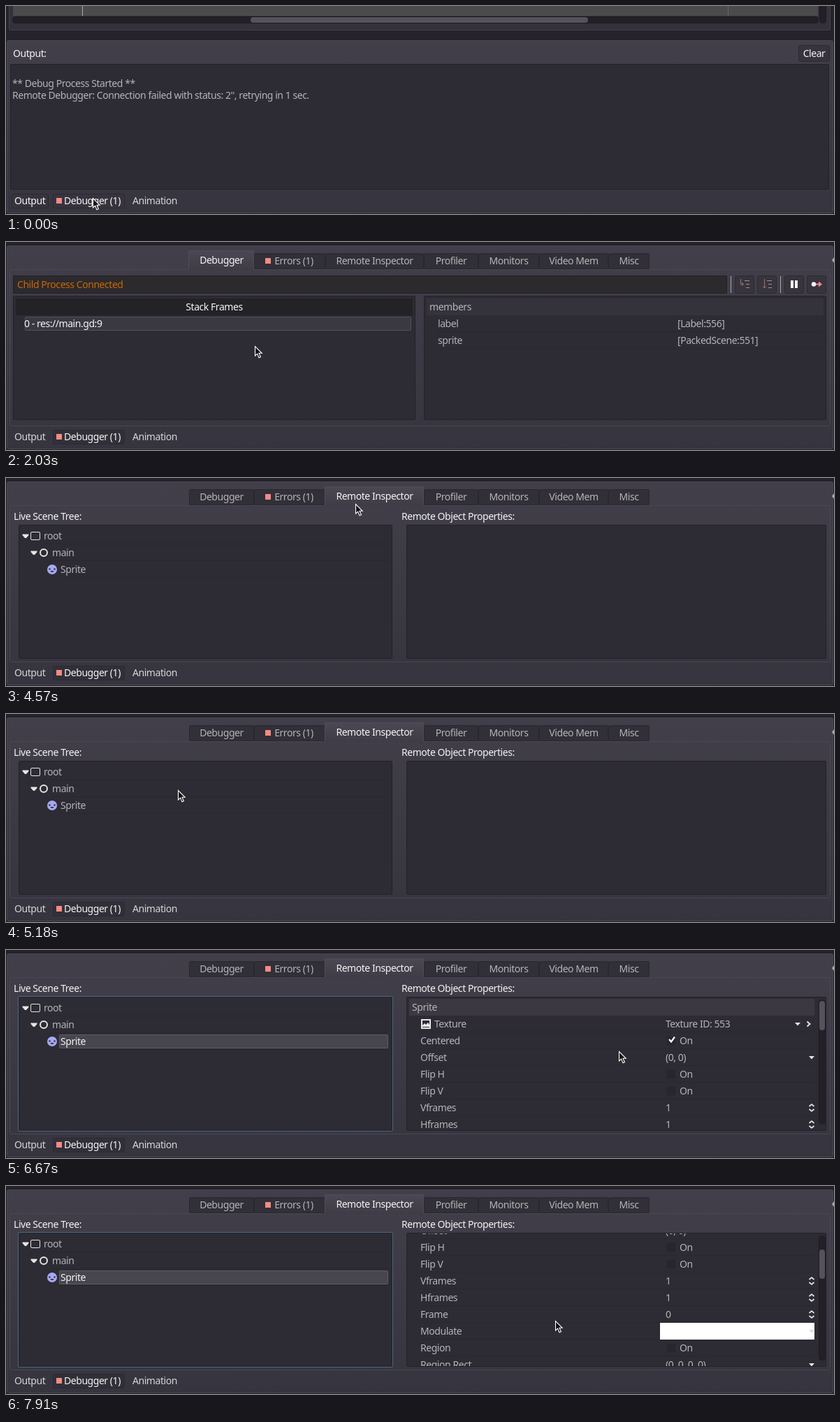
An HTML page that plays this animation: 1185x298 px, repeating every 8000 ms.

```html
<!DOCTYPE html>
<html lang="en">
<head>
<meta charset="utf-8">
<title>Debugger panel</title>
<style>
  html, body { margin: 0; width: 100%; height: 100%; overflow: hidden; background: #24222a; }
  svg { display: block; width: 1185px; height: 298px; }
  text { font: 14px "Noto Sans", "Open Sans", sans-serif; letter-spacing: -0.45px; white-space: pre; }
</style>
</head>
<body>
<svg id="stage" viewBox="0 0 1185 298">
  <defs>
    <linearGradient id="window" x1="0" y1="0" x2="0" y2="1">
      <stop offset="0" stop-color="#423f4a"/><stop offset="1" stop-color="#36343e"/>
    </linearGradient>
    <linearGradient id="tab" x1="0" y1="0" x2="0" y2="1">
      <stop offset="0" stop-color="#4b4854"/><stop offset="1" stop-color="#3f3c47"/>
    </linearGradient>
    <clipPath id="list"><rect x="574" y="68" width="599" height="190"/></clipPath>
  </defs>
</svg>
<script>
const LOOP = 8000;
const WHITE = '#f4f4f4', SOFT = '#b5b4b7', WELL = '#2d2b33', EDGE = '#232128', RED = '#f68a84';
const stage = document.getElementById('stage');

function add(parent, tag, attrs = {}, content) {
  const node = document.createElementNS('http://www.w3.org/2000/svg', tag);
  for (const key in attrs) node.setAttribute(key, attrs[key]);
  if (content !== undefined) node.textContent = content;
  return parent.appendChild(node);
}
const group = (parent = stage, attrs = {}) => add(parent, 'g', attrs);
const path = (g, d, attrs) => add(g, 'path', { d, fill: 'none', ...attrs });
const line = (g, d, stroke) => path(g, d, { stroke });

// Filled box given by its corners; a border is drawn inside the edge.
function box(g, x1, y1, x2, y2, fill, stroke, rx = 0) {
  const inset = stroke ? 0.5 : 0;
  return add(g, 'rect', {
    x: x1 + inset, y: y1 + inset, width: x2 - x1 - 2 * inset, height: y2 - y1 - 2 * inset,
    rx, fill, stroke: stroke || 'none'
  });
}
// Text placed by the middle of its line.
function label(g, x, mid, content, fill = WHITE, attrs = {}) {
  return add(g, 'text', { x, y: mid + 5, fill, ...attrs }, content);
}
const centered = { 'text-anchor': 'middle' };
const well = (g, x1, y1, x2, y2) => box(g, x1, y1, x2, y2, WELL, EDGE, 1);
const redSquare = (g, x, y) => box(g, x, y, x + 8, y + 8, RED);
const button = (g, x1, y1, x2, y2) => box(g, x1, y1, x2, y2, '#37343e', '#2b2931', 2);

function windowFrame(g, top) {
  box(g, 1, top, 1184, 297, 'url(#window)', '#4a4753', 2);
}

// Output screen
const output = group();
box(output, 4, -5, 1180, 35, '#34313b', '#45424e', 2);
box(output, 10, 0, 1162, 14, '#4c4b4c');
line(output, 'M109.5 0V14', '#aaa');
line(output, 'M1033.5 0V14', '#666');
box(output, 9, 15, 1163, 25, '#222026', '#1d1b21', 4);
box(output, 350, 16, 833, 24, '#55525d', null, 4);
box(output, 1164, -9, 1174, 25, '#222026', '#1d1b21', 4);
windowFrame(output, 49);
label(output, 10, 68, 'Output:');
button(output, 1134, 56, 1179, 80);
label(output, 1156.5, 68, 'Clear', WHITE, centered);
well(output, 6, 83, 1178, 263);
label(output, 9, 111, '** Debug Process Started **', SOFT);
label(output, 9, 128, "Remote Debugger: Connection failed with status: 2'', retrying in 1 sec.", SOFT);
button(output, 8, 269, 61, 290);

// Frame shared by both debugger screens
const debuggerFrame = group();
box(debuggerFrame, 0, 0, 1185, 5, '#24222a');
windowFrame(debuggerFrame, 5);
box(debuggerFrame, 5, 39, 1180, 264, 'none', '#4a4753', 2);
path(debuggerFrame, 'M1185 22l-3 4l3 4z', { fill: '#aaa' });

const tabEdges = [262, 355, 457, 598, 676, 763, 862, 921];
const tabNames = ['Debugger', 'Errors (1)', 'Remote Inspector', 'Profiler', 'Monitors', 'Video Mem', 'Misc'];
function tabBar(g, selected) {
  tabNames.forEach((name, i) => {
    const on = i === selected, shift = i === 1 ? 6 : 0;
    const left = tabEdges[i], right = tabEdges[i + 1];
    if (on) {
      box(g, left - 1, 12, right, 40, 'url(#tab)');
      line(g, `M${left - 0.5} 39V14q0-1.5 1.5-1.5H${right - 2}q1.5 0 1.5 1.5V39`, '#504d59');
    } else {
      box(g, left, 16, right, 39, '#312f38', '#292730', 1);
    }
    if (shift) redSquare(g, 371, 23);
    label(g, (left + right) / 2 + shift, on ? 26 : 27, name, on ? WHITE : SOFT, centered);
  });
}

// Stack frames screen
const stack = group();
tabBar(stack, 0);
box(stack, 10, 48, 1032, 74, '#2c2a2d', EDGE);
label(stack, 16, 61, 'Child Process Connected', '#c96805');
for (const x of [1037.5, 1108.5]) line(stack, `M${x} 49V73`, '#aaa8ad');
for (const x of [1043, 1075, 1114, 1146]) button(stack, x, 48, x + 28, 74);
for (const x of [1051, 1083]) {
  line(stack, `M${x + 6} 55.5H${x + 13}M${x + 8} 60.5H${x + 13}M${x + 8} 65.5H${x + 13}`, '#98969b');
}
path(stack, 'M1051.5 53V60.5H1055M1053 58l2.5 2.5l-2.5 2.5', { stroke: '#a8716a' });
path(stack, 'M1085.5 53V66M1083 63.5l2.5 2.5l2.5-2.5', { stroke: '#a8716a' });
box(stack, 1123, 55, 1127, 66, WHITE);
box(stack, 1129, 55, 1133, 66, WHITE);
add(stack, 'circle', { cx: 1156, cy: 60.5, r: 3.2, fill: WHITE });
path(stack, 'M1159 59.5h4v-3l5 4l-5 4v-3h-4z', { fill: RED });
well(stack, 10, 77, 586, 255);
box(stack, 14, 81, 582, 105, '#232226');
label(stack, 298, 93, 'Stack Frames', WHITE, centered);
box(stack, 27, 107, 580, 127, '#3a3841', '#54515d', 1);
label(stack, 26, 117, '0 - res://main.gd:9');
well(stack, 598, 77, 1174, 255);
box(stack, 602, 81, 1170, 105, '#34323a');
label(stack, 606, 93, 'members', SOFT);
[['label', '[Label:556]'], ['sprite', '[PackedScene:551]']].forEach(([name, value], i) => {
  const y = 117 + 24 * i;
  label(stack, 618, y, name, SOFT);
  label(stack, 961, y, value, SOFT);
  line(stack, `M614 ${y + 11.5}H1170`, '#29272f');
});

// Remote inspector screen
const inspector = group();
tabBar(inspector, 2);
label(inspector, 11, 55, 'Live Scene Tree:');
label(inspector, 566, 55, 'Remote Object Properties:');
well(inspector, 18, 67, 553, 259);
const focusRing = box(inspector, 17, 66, 554, 260, 'none', '#4b6a86', 1);
well(inspector, 573, 67, 1174, 259);

const tree = group(inspector);
const selection = box(tree, 76, 121, 547, 141, '#47454e', '#5f5c67', 1);
const foldArrow = (x, y) => path(tree, `M${x} ${y}h9v1.5l-3.5 4h-2l-3.5-4z`, { fill: '#e4e4e4' });
foldArrow(23.5, 80.5);
foldArrow(35.5, 104.5);
box(tree, 35, 77, 49, 89, 'none', '#e4e4e4', 1.5);
add(tree, 'circle', { cx: 54, cy: 107, r: 5, fill: 'none', stroke: '#e4e4e4', 'stroke-width': 2 });
add(tree, 'circle', { cx: 66, cy: 131, r: 7, fill: '#a5a9f4' });
for (const x of [62.5, 69.5]) add(tree, 'circle', { cx: x, cy: 130.5, r: 1.2, fill: WELL });
path(tree, 'M63.5 133h5q-0.5 2-2.5 2t-2.5-2z', { fill: WELL });
for (const [x, y] of [[52, 94.5], [64, 118.5], [76, 142.5]]) line(tree, `M${x} ${y}H547`, '#29272f');
label(tree, 54, 83, 'root', SOFT);
label(tree, 66, 107, 'main', SOFT);
const spriteLabel = label(tree, 78, 131, 'Sprite', SOFT);

// Property list
const props = group(inspector);
const rows = group(group(props, { 'clip-path': 'url(#list)' }));
box(rows, 577, 70, 1157, 94, '#3b3841');
label(rows, 581, 82, 'Sprite', SOFT);
const dropArrow = (x, y, fill = '#e4e4e4') => path(rows, `M${x} ${y - 2}h8l-4 4.5z`, { fill });

const drawValue = {
  check(y, on) {
    box(rows, 945, y - 7, 959, y + 7, '#28262d', '#2b2930', 2);
    if (on) path(rows, `M949 ${y - 2}l3 3.5l5-7`, { stroke: '#fff', 'stroke-width': 2.2 });
    label(rows, 964, y, 'On', SOFT);
  },
  number(y, value) {
    label(rows, 944, y, value, SOFT);
    path(rows, `M1149.5 ${y - 2}l3.5-3l3.5 3M1149.5 ${y + 2}l3.5 3l3.5-3`, { stroke: '#e4e4e4', 'stroke-width': 1.7 });
  },
  vector(y, value) {
    label(rows, 944, y, value, SOFT);
    dropArrow(1149, y);
  },
  color(y) {
    box(rows, 936, y - 12, 1157, y + 12, '#fff');
    dropArrow(1149, y, '#ddd');
  },
  texture(y, value) {
    add(rows, 'rect', { x: 595, y: y - 6, width: 12, height: 12, fill: 'none', stroke: '#e8e8e8', 'stroke-width': 2 });
    path(rows, `M596 ${y + 4}v-2l3-3l2 2l3-3l2 3v3z`, { fill: '#e8e8e8' });
    label(rows, 944, y, value, SOFT);
    path(rows, `M1146.5 ${y - 3.5}l4 3.5l-4 3.5`, { stroke: '#e4e4e4', 'stroke-width': 2 });
  }
};
[
  ['Texture', 'texture', 'Texture ID: 553'], ['Centered', 'check', true], ['Offset', 'vector', '(0, 0)'],
  ['Flip H', 'check'], ['Flip V', 'check'], ['Vframes', 'number', '1'], ['Hframes', 'number', '1'],
  ['Frame', 'number', '0'], ['Modulate', 'color'], ['Region', 'check'], ['Region Rect', 'vector', '(0, 0, 0, 0)']
].forEach(([name, kind, value], i) => {
  const y = 106 + 24 * i;
  line(rows, `M593 ${y + 11.5}H1157`, '#29272f');
  label(rows, kind === 'texture' ? 613 : 593, y, name, SOFT);
  drawValue[kind](y, value);
});
const textureArrow = dropArrow(1129, 106);
box(props, 1163, 71, 1173, 250, '#232127', '#1f1d23', 4);
const thumb = box(props, 1164, 73, 1172, 115, '#55525d', null, 4);

// Bottom bar
const bar = group();
const debugButton = button(bar, 67, 269, 170, 290);
redSquare(bar, 72, 275);
const outputLabel = label(bar, 12, 279, 'Output');
label(bar, 83, 279, 'Debugger (1)');
label(bar, 181, 279, 'Animation', '#d6d5d8');

const cursor = path(stage, 'M0.5 0.5V14l3.1-2.9l2.4 5.6l2.4-1l-2.4-5.4h4.2z',
  { fill: '#111', stroke: '#fff', 'stroke-width': 1.1 });

// Pointer stops: time, x, y
const stops = [
  [0, 124, 275], [149, 124, 275], [150, 121, 273], [510, 121, 273], [660, 128, 279],
  [1820, 128, 279], [2060, 390, 130], [2280, 612, 2], [2480, 540, 20], [2640, 493, 33], [2800, 506, 34],
  [2960, 516, 30], [4390, 516, 30], [4570, 500, 37], [4860, 380, 76], [5210, 234, 112],
  [5430, 135, 127], [5580, 109, 130], [6140, 109, 130], [6380, 440, 190], [6670, 877, 145],
  [6820, 855, 107], [6970, 805, 131], [7100, 794, 170], [7240, 786, 193], [LOOP, 786, 193]
];
// Slope at a stop, flat where the pointer rests or turns.
function slope(i, axis) {
  const a = stops[i - 1], b = stops[i], c = stops[i + 1];
  if (!a || !c) return 0;
  const before = b[axis] - a[axis], after = c[axis] - b[axis];
  return before * after <= 0 ? 0 : (before + after) / (c[0] - a[0]);
}
function pointer(t, axis) {
  const i = Math.max(0, stops.findIndex(s => s[0] > t) - 1);
  const a = stops[i], b = stops[i + 1], span = b[0] - a[0], u = (t - a[0]) / span;
  const u2 = u * u, u3 = u2 * u;
  return a[axis] * (2 * u3 - 3 * u2 + 1) + b[axis] * (3 * u2 - 2 * u3)
    + span * (slope(i, axis) * (u3 - 2 * u2 + u) + slope(i + 1, axis) * (u3 - u2));
}

const show = (node, on) => node.setAttribute('visibility', on ? 'inherit' : 'hidden');
const scrollTimes = [7450, 7590, 7800, 7910];

function render(t) {
  const opened = t >= 1470, inspecting = t >= 3530, picked = t >= 5670;
  show(output, !opened);
  show(debuggerFrame, opened);
  show(stack, opened && !inspecting);
  show(inspector, inspecting);
  show(tree, t >= 3920);
  show(selection, picked);
  show(focusRing, picked);
  show(props, t >= 5750);
  show(textureArrow, t >= 5900);
  spriteLabel.setAttribute('fill', picked ? WHITE : SOFT);
  outputLabel.setAttribute('fill', opened ? '#d6d5d8' : WHITE);
  debugButton.setAttribute('fill', t < 1260 ? '#37343e' : '#312f38');

  const scroll = 22.5 * scrollTimes.filter(s => t >= s).length;
  rows.setAttribute('transform', `translate(0 ${-scroll})`);
  thumb.setAttribute('y', 73 + scroll * 0.2);
  cursor.setAttribute('transform', `translate(${Math.round(pointer(t, 1))} ${Math.round(pointer(t, 2))})`);
}

const start = performance.now();
function tick() {
  render((performance.now() - start) % LOOP);
  requestAnimationFrame(tick);
}
tick();
</script>
</body>
</html>
```
